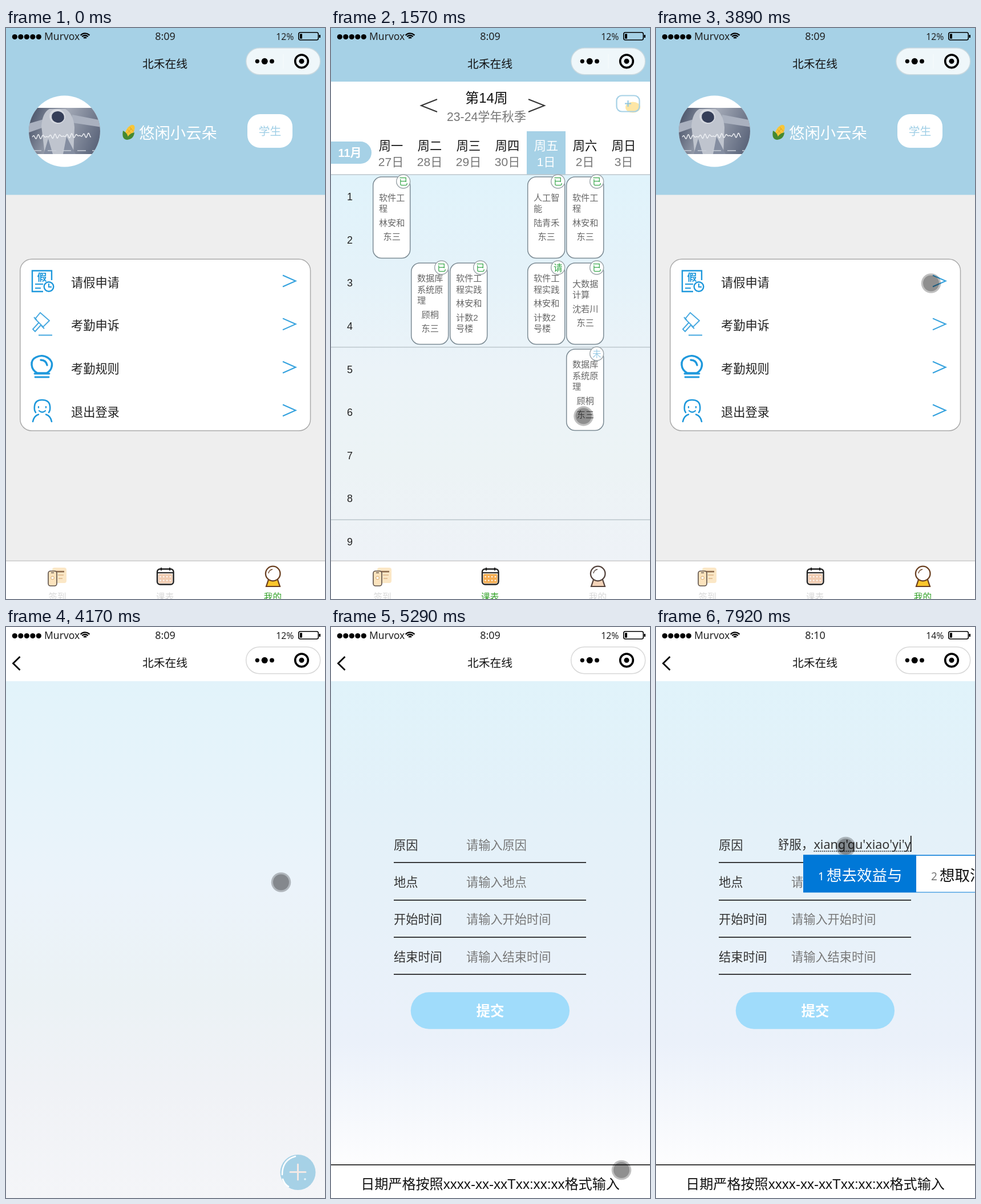
Animation of 559x1001 px, one loop 8 s. Source, as an HTML page with a canvas:

```html
<!DOCTYPE html>
<html lang="zh-CN">
<head>
<meta charset="utf-8">
<style>
html, body { margin: 0; width: 100%; height: 100%; overflow: hidden; background: #eee; }
canvas { display: block; width: 559px; height: 1001px; }
</style>
</head>
<body>
<canvas id="stage"></canvas>
<script>
const W = 559, H = 1001, LOOP = 8000;
const UI = '"Noto Sans","Noto Sans CJK SC",sans-serif';
const ARIAL = '"Liberation Sans","Noto Sans CJK SC",sans-serif';
const SKY = '#a6d1e6', BLUE = '#1e98dc', GREEN = '#34a32a';
const canvas = document.getElementById('stage');
const c = canvas.getContext('2d');
const dpr = window.devicePixelRatio || 1;
canvas.width = W * dpr;
canvas.height = H * dpr;

// ---------- helpers ----------
function rect(x, y, w, h, fill) {
  c.fillStyle = fill;
  c.fillRect(x, y, w, h);
}
function paint(fill, stroke, width = 1.5) {
  if (fill) { c.fillStyle = fill; c.fill(); }
  if (stroke) { c.strokeStyle = stroke; c.lineWidth = width; c.stroke(); }
}
function round(x, y, w, h, r, fill, stroke, width) {
  c.beginPath();
  c.roundRect(x, y, w, h, r);
  paint(fill, stroke, width);
}
function oval(x, y, rx, ry, rot, fill, stroke, width) {
  c.beginPath();
  c.ellipse(x, y, rx, ry, rot, 0, 7);
  paint(fill, stroke, width);
}
const disc = (x, y, r, fill, stroke, width) => oval(x, y, r, r, 0, fill, stroke, width);
function path(d, stroke, width, fill) {
  const p = new Path2D(d);
  if (fill) { c.fillStyle = fill; c.fill(p); }
  if (stroke) { c.strokeStyle = stroke; c.lineWidth = width; c.stroke(p); }
}
// y is the visual middle of the line
function text(s, x, y, size, color, align = 'left', font = UI, weight = 400) {
  c.font = `${weight} ${size}px ${font}`;
  c.textAlign = align;
  c.fillStyle = color;
  c.fillText(s, x, y + size * 0.37);
}
function gradient(top, bottom, ...colors) {
  const g = c.createLinearGradient(0, top, 0, bottom);
  colors.forEach((col, i) => g.addColorStop(i / (colors.length - 1), col));
  rect(0, top, W, bottom - top, g);
}

// ---------- shared chrome ----------
function header(t, plain) {
  rect(0, 0, W, 95, plain ? '#fff' : SKY);
  for (let i = 0; i < 5; i++) disc(15.3 + i * 10.5, 15.5, 4.6, '#000');
  text('Murvox', 67, 14.5, 17.5, '#222');
  [9.6, 6, 2.2].forEach(r => {
    c.beginPath();
    c.arc(138.5, 20, r + 1, -2.4, -0.74);
    paint(null, '#000', 2.4);
  });
  const late = t >= 5840;
  text(late ? '8:10' : '8:09', 279, 14, 18, '#222', 'center');
  text(late ? '14%' : '12%', 504.5, 15.5, 15.8, '#222', 'right');
  round(512.8, 7.8, 34.5, 13.2, 3, null, '#000', 1.6);
  rect(515, 10.3, 4, 8.4, '#000');
  rect(548.5, 12, 2.5, 5, '#000');
  text('北禾在线', 278.5, 63, 19.8, '#111', 'center');
  round(420.7, 35, 130, 46.7, 23.3, plain ? '#fff' : 'rgba(255,255,255,.82)', plain ? '#d8d8d8' : '#c8d8df');
  if (!plain) rect(485.5, 46, 1, 25, '#f7fbfc');
  disc(440.3, 58.3, 3.6, '#000');
  disc(453.2, 58.3, 5.5, '#000');
  disc(466, 58.3, 3.9, '#000');
  disc(518, 58.3, 11.3, null, '#000', 3.6);
  disc(518, 58.3, 4.5, '#000');
  if (plain) path('M24.5 52L12.5 63.8L24.5 75.6', '#000', 2.8);
}

function tabBar(active) {
  rect(0, 934, W, 67, '#fff');
  rect(0, 933.5, W, 1.5, '#ccc');
  round(81, 946, 25, 27, 4, '#fbe7c6');
  path('M86 953H102', '#8a6a4c', 2.6);
  path('M91 959H101M92 965h7', '#dcb588', 1.6);
  round(74, 952, 15, 26, 4, '#fbe3bd', '#5d5048', 1.6);
  disc(81.5, 964, 2.8, '#fff', '#d5a768', 1);
  path('M79 955H84', '#5d5048', 1.4);

  round(265, 948.5, 28.5, 27, 5, '#fff', '#222', 2.4);
  round(267, 957, 24.5, 16.5, 2, active === 1 ? '#f5ae55' : '#f1cdb3');
  path('M265 955H293M272 946v5M287 946v5', '#222', 2.2);
  for (let i = 0; i < 8; i++) disc(270.5 + i % 4 * 5.8, 962 + (i >> 2) * 6.5, 1.2, '#fff');

  const rim = active === 2 ? '#6a3f20' : '#54433c';
  path('M460 967L456 979H480L476 967Z', rim, 2.2, active === 2 ? '#fcc62b' : '#f3d3b8');
  disc(467.7, 956.5, 12.8, '#fff', rim, 2.3);
  path('M460 956A8 8 0 0 1 467 949', rim, 1.4);
  ['签到', '课表', '我的'].forEach((s, i) =>
    text(s, 90 + i * 188.7, 997.5, 15.6, i === active ? GREEN : '#d9d9d9', 'center'));
}

// ---------- profile page ----------
function avatar() {
  c.save();
  disc(102.5, 181, 62.5, '#fff');
  c.clip();
  const g = c.createLinearGradient(40, 150, 165, 200);
  g.addColorStop(0, '#465066');
  g.addColorStop(.45, '#a3a9b6');
  g.addColorStop(1, '#596379');
  rect(38, 140, 130, 81, g);
  path('M38 168L66 160V174L38 184ZM116 152L168 162V174L116 166Z', null, 0, '#aab1bf');
  path('M68 221L62 172Q64 148 76 142H104Q118 150 120 174L118 221Z', null, 0, '#bfc4ce');
  path('M74 194L82 221H66ZM106 190L122 221H100Z', null, 0, '#848da0');
  oval(90, 155, 14, 13, .2, '#d5d8df');
  oval(91, 156, 11, 10, .2, '#353e58');
  // illegible handwriting
  c.beginPath();
  for (let x = 46; x < 150; x++) {
    c.lineTo(x, 191 - (x - 46) * .03 + 4 * Math.sin(x * .75) * Math.cos(x * .11));
  }
  paint(null, '#eef0f4', 1.4);
  c.setLineDash([15, 11]);
  path('M47 215H160', '#c9ced8', 1.5);
  c.restore();
}

function corn() {
  oval(217, 181, 6.5, 12.5, .55, '#f7c63a');
  path('M213 178l8 9M217 174l7 8M220 176l-8 9', '#e0a01f', 1);
  path('M205 180Q202 196 213 196Q216 186 205 180ZM212 196Q224 195 225 183Q214 185 211 196Z', null, 0, '#45892f');
}

function menuIcons() {
  path('M80 442V425.5H46V462H65', BLUE, 2.4);
  text('假', 63, 437, 17, BLUE, 'center', UI, 700);
  path('M51 449H65M51 456H61', BLUE, 2.2);
  disc(75, 453.5, 8.3, '#fff', BLUE, 2.4);
  path('M75 448V454H80', BLUE, 2);

  path('M60 499L51 510L65 524L76 513ZM49 507L54 512M62 522L67 527M57 517L47 528L51 532L61 521M57 538.5H81', '#45a8e0', 1.9);

  c.lineCap = 'round';
  path('M55 605C43 599 41 582 53 577C67 570 84 581 80 594C79 599 75 603 71 605ZM61 582Q70 582 72 591', BLUE, 3.4);
  path('M50 606H76M51 612H75', BLUE, 2.8);
  path('M52 674Q49 670 50 663Q51 652 63 652Q76 652 77 663Q78 670 75 674M47 690Q49 680 57 677.5M80 690Q78 680 70 677.5', BLUE, 2.6);
  path('M57 664v1.5M70 664v1.5M58 671Q63.5 676 69 671', BLUE, 2.3);
  c.lineCap = 'butt';
}

function profile(t) {
  rect(0, 0, W, H, '#eee');
  header(t);
  rect(0, 94, W, 198.5, SKY);
  avatar();
  corn();
  text('悠闲小云朵', 233, 184, 27.4, '#fff');
  round(423, 151, 79, 59, 22, '#fff');
  text('学生', 462.5, 181, 19.8, '#a0cfe6', 'center');
  round(24.8, 405.3, 508.7, 300.7, 20, '#fff', '#aaa');
  menuIcons();
  ['请假申请', '考勤申诉', '考勤规则', '退出登录'].forEach((s, i) => {
    const y = 446 + i * 75.6;
    text(s, 114, y, 21.2, '#222');
    path(`M485 ${y - 12.5}L507.5 ${y - 2.5}L485 ${y + 7.5}`, '#35a2de', 2.1);
  });
  tabBar(2);
}

// ---------- timetable page ----------
const lab = [['数据库', '系统原', '理'], ['顾桐'], ['东三']];
const basics = [['软件工', '程'], ['林安和'], ['东三']];
const practice = [['软件工', '程实践'], ['林安和'], ['计数2', '号楼']];
// left edge, row, badge, blocks of lines
const lessons = [
  [73.7, 0, '已', basics],
  [140.7, 1, '已', lab],
  [208.7, 1, '已', practice],
  [344.7, 0, '已', [['人工智', '能'], ['陆青禾'], ['东三']]],
  [344.7, 1, '请', practice],
  [412.7, 0, '已', basics],
  [412.7, 1, '已', [['大数据', '计算'], ['沈若川'], ['东三']]],
  [412.7, 2, '未', lab]
];

function lesson([x, row, badge, blocks]) {
  const top = 261 + row * 151, size = 15.2;
  round(x, top, 65, 142.5, 15, '#fff', '#7c8b94');
  const lines = blocks.flat().length;
  let y = top + 70.5 - ((lines - 1) * 19.5 + 10) / 2;
  for (const block of blocks) {
    const left = x + 33 - Math.max(...block.map(s => s.length)) * size / 2;
    for (const s of block) {
      text(s, left, y, size, '#666', 'left', ARIAL);
      y += 19.5;
    }
    y += 5;
  }
  disc(x + 53, top + 8, 12, '#fff', '#9aa3a8', 1.4);
  text(badge, x + 53, top + 8.5, 15.6, badge === '未' ? '#9bcbe4' : '#2fa343', 'center');
}

function timetable(t, loaded) {
  header(t);
  rect(0, 94, W, 163, '#fff');
  path('M186 125L158 136L186 147M346 125L374 136L346 147', '#333', 2);
  text('第14周', 272.5, 122, 24, '#111', 'center', ARIAL);
  text('23-24学年秋季', 272.5, 155, 21.2, '#777', 'center', ARIAL);
  oval(529, 139, 13, 9.5, 0, '#fde6a6');
  round(500.5, 118.5, 40, 28, 9, null, SKY, 2.2);
  path('M515 132.5H526M520.5 127V138', '#8fc6e2', 2);

  round(-5, 199, 76, 39, [0, 20, 20, 0], SKY);
  text('11月', 33, 219, 20, '#fff', 'center', ARIAL, 700);
  rect(343, 181, 68, 76, SKY);
  [...'一二三四五六日'].forEach((d, i) => {
    const x = 105 + i * 68, on = i === 4;
    text('周' + d, x, 206.5, 21.2, on ? '#fff' : '#111', 'center');
    text([27, 28, 29, 30, 1, 2, 3][i] + '日', x, 234.5, 21, on ? '#fff' : '#777', 'center', ARIAL);
  });
  gradient(257, 934, '#e0f3fb', '#e4f2f9', '#ebf3f8', '#ecf3f5', '#eef2f7');
  [257, 559.5, 862].forEach(y => rect(0, y - .7, W, 1.5, '#bcc7cc'));
  for (let i = 0; i < 9; i++) text(i + 1, 33, 295.5 + i * 75.6, 18, '#222', 'center', ARIAL);
  if (loaded) lessons.forEach(lesson);
  tabBar(1);
}

// ---------- leave list ----------
function leave(y, course, from, to, state, color) {
  round(51, y, 450, 114, 21, '#fbfcfc');
  [['请假课程', course], ['开始时间', from], ['结束时间', to]].forEach(([k, v], i) => {
    text(k, 66, y + 31 + i * 28, 21.1, '#000', 'left', ARIAL, 700);
    text(v, 171.5, y + 31.5 + i * 28, 18, '#444', 'left', ARIAL);
  });
  text(state, 440.5, y + 59, 27.2, color, 'center');
}

function leaveList(t, loaded) {
  header(t, true);
  gradient(95, H, '#e2f3fa', '#e6f3fa', '#ebf3fa', '#ebf2f5', '#f0f2f6', '#f4f5f8');
  if (loaded) {
    leave(132.5, '软件 工程', '2023-11-24T00:00:00', '2023-11-24T22:00:00', '通过', '#b5dfcc');
    leave(277, '数据库系统原理', '2023-11-28T10:20:00', '2023-11-28T12:00:00', '不通过', '#333');
  }
  disc(511.5, 956, 31, SKY);
  c.lineCap = 'round';
  path('M507 928Q484 934 484 960M485 968Q488 977 495 981', '#fff', 2.6);
  disc(524, 968, 1.8, '#e8f5fb');
  path('M498 955.5H525M511.5 942V969', '#f3e9e6', 3);
  c.lineCap = 'butt';
}

// ---------- leave form with input method ----------
// time, committed text, composition, candidates
const typing = [
  [5670, '', '', []],
  [6130, '', 's', ['是', '说', '上', '时']],
  [6230, '', 'she', ['社', '设', '射', '蛇']],
  [6320, '', 'shen', ['神', '伸', '申', '身']],
  [6420, '', "shen't", ['身体', '神态', '神坛']],
  [6520, '', "shen'ti'b", ['身体不', '身体', '神']],
  [6700, '', "shen'ti'bu'shu'fu", ['身体不舒服', '身体不']],
  [6800, '身体不舒服，', '', []],
  [7280, '身体不舒服，', 'xi', ['系', '西', '洗']],
  [7370, '身体不舒服，', 'xiang', ['想', '向', '像']],
  [7460, '身体不舒服，', "xiang'qu", ['想去', '向', '像']],
  [7640, '身体不舒服，', "xiang'qu'x", ['想去下', '想去']],
  [7730, '身体不舒服，', "xiang'qu'xia", ['想去下', '想去']],
  [7820, '身体不舒服，', "xiang'qu'xiao'y", ['想去效益', '想去']],
  [7910, '身体不舒服，', "xiang'qu'xiao'yi'y", ['想去效益与', '想取消一样']]
];

// draws the field and returns the left edge of the candidate bar
function reason(done, comp) {
  const size = 21.6, left = 216, right = 446.5;
  c.font = `400 ${size}px ${UI}`;
  const a = c.measureText(done).width, b = c.measureText(comp).width;
  const shift = Math.max(0, left + a + b - right);
  const start = left + a - shift;
  c.save();
  c.beginPath();
  c.rect(left - .5, 364, 232, 32);
  c.clip();
  text(done, left - shift, 381.5, size, '#333');
  text(comp, start, 381.5, size, '#333');
  c.setLineDash([2, 1.5]);
  if (comp) path(`M${start} 393H${start + b}`, '#222', 1.4);
  c.restore();
  rect(start + b - .5, 366, 1.5, 28, '#000');
  return Math.round(start - (shift ? 18 : 5));
}

function candidates(x, words, hint) {
  const accent = '#0078d7', size = 26.5;
  rect(x, 399.5, W, hint ? 106 : 66, accent);
  rect(x + 1.5, 401, W, 63.5, '#fff');
  let at = x;
  words.forEach((s, i) => {
    const w = 65.5 + s.length * size;
    if (!i) rect(at, 399.5, w, 65.5, accent);
    text(i + 1, at + 26, 437, 19, i ? '#777' : '#fff');
    text(s, at + 41, 435.5, size, i ? '#111' : '#fff');
    at += w;
  });
  if (hint) {
    rect(x + 1.5, 466, W, 38, '#fff');
    text('点击前往设置页面开启模糊音<en,eng>', x + 13, 486, 20.5, '#666');
  }
}

function form(t) {
  header(t, true);
  gradient(95, 942, '#e0f3fa', '#e3f1f9', '#e7f1f9', '#ebf1fa', '#fdfdfe');
  const input = typing.filter(s => s[0] <= t).pop();
  ['原因', '地点', '开始时间', '结束时间'].forEach((s, i) => {
    const y = 381.8 + i * 65.4;
    text(s, 110, y, 21.2, '#333');
    if (i || t < 6130) text('请输入' + s, 237, y, 21.2, '#777');
    rect(110, Math.round(y + 30.4), 337, 1.6, '#111');
  });
  round(139.7, 640.3, 278.3, 64.4, 32.2, '#a0dcfb');
  text('提交', 279, 672.5, 24.5, '#fff', 'center', UI, 700);
  rect(0, 942, W, 59, '#fff');
  rect(0, 942, W, 1.6, '#111');
  text('日期严格按照xxxx-xx-xxTxx:xx:xx格式输入', 279, 976, 24.1, '#111', 'center', ARIAL);
  const x = input ? reason(input[1], input[2]) : 0;
  pointer(t);
  if (input && input[2]) candidates(x, input[3], input[2] === 'shen');
}

// ---------- pointer ----------
const route = [
  [1190, 284, 1025], [1290, 287, 988], [1380, 335, 890], [1475, 400, 765], [1567, 442.5, 680.5],
  [1750, 458, 632], [2030, 469, 601], [2310, 439, 650], [2600, 480, 728], [2860, 464.5, 767.5],
  [2960, 464.5, 767.5], [3150, 467, 960], [3240, 467, 1025], [3430, 467, 1025], [3530, 468, 965],
  [3700, 477, 640], [3800, 481, 480], [3870, 482, 447.5], [4610, 482, 447.5], [4710, 496, 720],
  [4800, 509, 952], [5390, 509, 952], [5540, 430, 690], [5630, 336, 381], [5730, 336, 381], [5820, 332.5, 385]
];

// moves in steps, as a screen capture does
function pointer(t) {
  const q = 1290 + Math.floor((t - 1290) / 92.5 + .02) * 92.5;
  let i = route.findIndex(p => p[0] > q);
  if (!i) return;
  if (i < 0) i = route.length - 1;
  const [t0, x0, y0] = route[i - 1], [t1, x1, y1] = route[i];
  const k = Math.min(1, (q - t0) / (t1 - t0));
  const x = x0 + (x1 - x0) * k, y = y0 + (y1 - y0) * k;
  disc(x, y, 17.3, 'rgba(0,0,0,.25)');
  disc(x, y, 14, 'rgba(0,0,0,.25)');
}

// ---------- timeline ----------
function draw(t) {
  c.setTransform(dpr, 0, 0, dpr, 0, 0);
  c.lineCap = 'butt';
  if (t >= 5010) return form(t);
  if (t < 530 || (t >= 3240 && t < 4080)) profile(t);
  else if (t < 3240) timetable(t, t >= 620);
  else leaveList(t, t >= 4350);
  pointer(t);
}

function tick() {
  draw(performance.now() % LOOP);
  requestAnimationFrame(tick);
}
tick();
</script>
</body>
</html>
```
